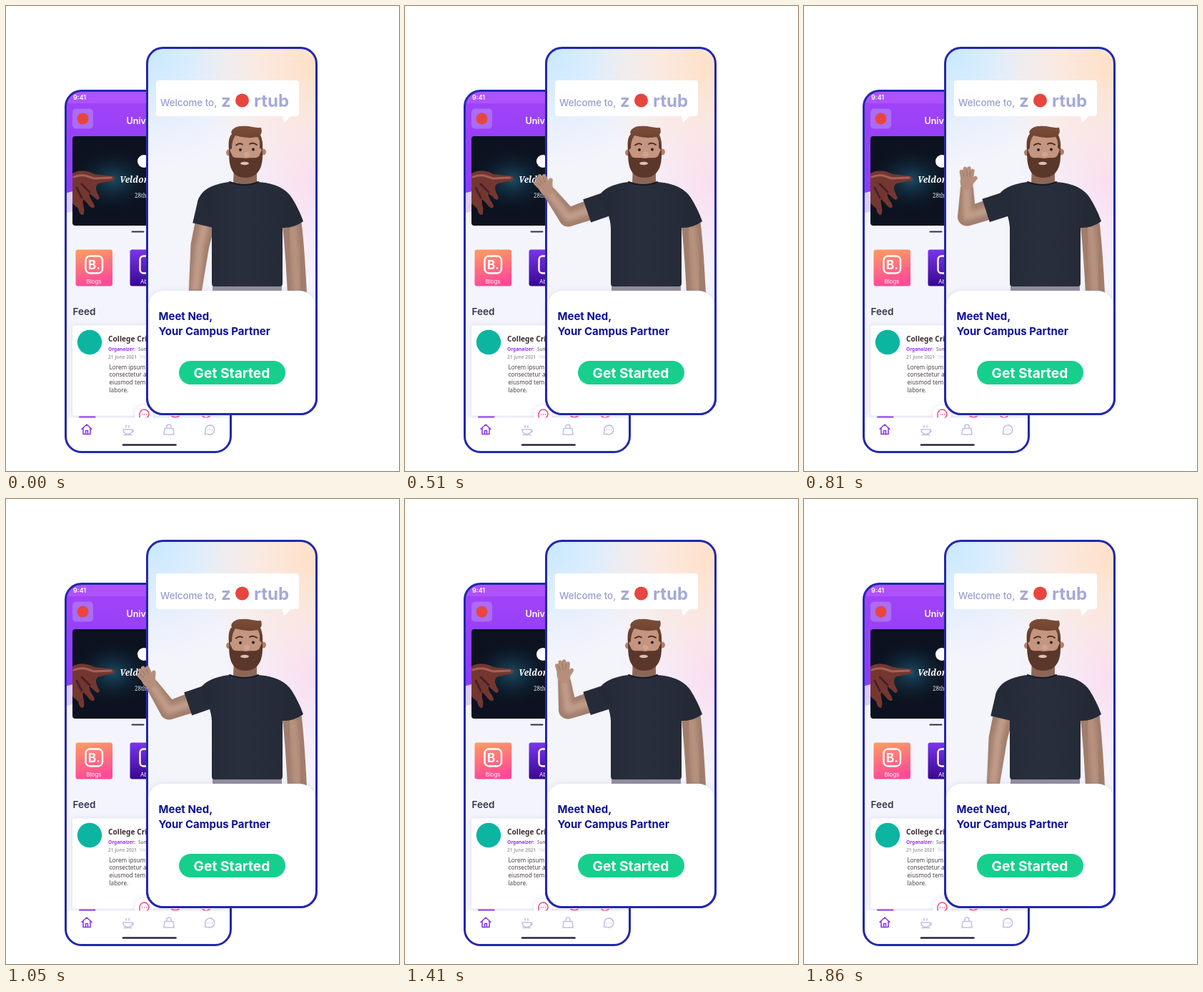
Write an HTML page that moves like this. It is 550 by 650 pixels and loops after 2.7 s.

```html
<!DOCTYPE html>
<html lang="en">
<head>
<meta charset="utf-8">
<style>
html, body { margin: 0; width: 100%; height: 100%; overflow: hidden; background: #fff; }
svg { display: block; }
text { font-family: Inter, sans-serif; }
.body { font-family: "Noto Sans", sans-serif; }
.serif { font-family: "Noto Serif", serif; }
.line { fill: none; stroke-linecap: round; stroke-linejoin: round; }
.frame { fill: none; stroke: #2327ad; stroke-width: 3; }
</style>
</head>
<body>
<svg width="550" height="650" viewBox="0 0 550 650">
<defs>
  <linearGradient id="header" x2="0" y2="1"><stop stop-color="#a344f8"/><stop offset="1" stop-color="#8a3cf6"/></linearGradient>
  <linearGradient id="blogs" x2=".2" y2="1"><stop stop-color="#ff9d60"/><stop offset="1" stop-color="#ff4a97"/></linearGradient>
  <linearGradient id="about" x2="0" y2="1"><stop stop-color="#7a35ee"/><stop offset="1" stop-color="#38078f"/></linearGradient>
  <radialGradient id="glow"><stop stop-color="#1c5670" stop-opacity=".85"/><stop offset="1" stop-color="#0c1220" stop-opacity="0"/></radialGradient>
  <radialGradient id="sky" gradientUnits="userSpaceOnUse" cx="205" cy="65" r="160"><stop stop-color="#c8e9ff"/><stop offset="1" stop-color="#d6e8ff" stop-opacity="0"/></radialGradient>
  <radialGradient id="peach" gradientUnits="userSpaceOnUse" cx="425" cy="85" r="165"><stop stop-color="#ffe0c8"/><stop offset="1" stop-color="#ffe4d4" stop-opacity="0"/></radialGradient>
  <radialGradient id="pink" gradientUnits="userSpaceOnUse" cx="440" cy="245" r="140"><stop stop-color="#fbdcee"/><stop offset="1" stop-color="#f8e0f2" stop-opacity="0"/></radialGradient>
  <linearGradient id="shirt"><stop stop-color="#242937"/><stop offset=".45" stop-color="#2a2f3e"/><stop offset="1" stop-color="#252a37"/></linearGradient>
  <linearGradient id="hair" x2="0" y2="1"><stop stop-color="#7c4e39"/><stop offset="1" stop-color="#5d382b"/></linearGradient>
  <filter id="soft" x="-50%" y="-50%" width="200%" height="200%"><feGaussianBlur stdDeviation="3"/></filter>
  <filter id="shade" x="-20%" y="-20%" width="140%" height="140%"><feDropShadow dx="0" dy="0" stdDeviation="3" flood-color="#6a70b0" flood-opacity=".2"/></filter>
  <clipPath id="backClip"><rect x="83.500" y="118.500" width="231" height="505" rx="22"/></clipPath>
  <clipPath id="bannerClip"><rect x="93" y="182" width="211" height="125" rx="4"/></clipPath>
</defs>

<!-- back phone -->
<g clip-path="url(#backClip)">
  <rect x="82" y="117" width="234" height="508" fill="#f4f5fc"/>
  <path d="M82 117H316V230L82 290Z" fill="#dccdfb"/>
  <path d="M82 117H316V200L82 262Z" fill="url(#header)"/>
  <path d="M82 117H316V136H82Z" fill="#ae52fb"/>
  <text x="94" y="131" font-size="9" font-weight="600" fill="#fff">9:41</text>
  <rect x="93" y="143.500" width="29" height="28" rx="5" fill="#b07af6" opacity=".75"/>
  <circle cx="107.500" cy="157.500" r="8" fill="#e8453f"/>
  <text x="168.500" y="165" font-size="12.500" font-weight="600" fill="#fff">University</text>

  <g clip-path="url(#bannerClip)">
    <rect x="93" y="182" width="211" height="125" fill="#0c1220"/>
    <ellipse cx="150" cy="243" rx="60" ry="48" fill="url(#glow)"/>
    <path d="M93 234C105 227 116 231 124 235L150 238Q154 241 150 244L130 248C122 252 128 262 131 268Q129 274 124 268L117 262C115 268 124 275 124 281Q120 285 113 275L108 270C106 277 112 284 108 292Q103 293 101 283L93 276Z" fill="#74372f"/>
    <path d="M95 239C106 234 114 238 123 241L147 240" class="line" stroke="#a4625a" stroke-width="3"/>
    <path d="M106 249L117 260M99 254L106 268" class="line" stroke="#45202b" stroke-width="3"/>
    <circle cx="193" cy="217" r="9" fill="#fff"/>
    <text class="serif" x="159" y="247" font-size="12" font-style="italic" font-weight="600" fill="#fff">Veldor Night</text>
    <text class="serif" x="180" y="268" font-size="8" fill="#dfe8ee">28th</text>
  </g>
  <path d="M176.500 315.500H192.500" class="line" stroke="#2c2e55" stroke-width="2"/>

  <rect x="97.500" y="340.500" width="51.500" height="51" rx="3" fill="url(#blogs)"/>
  <rect x="111.500" y="349.500" width="23.500" height="24" rx="6" class="line" stroke="#fff" stroke-width="2.400"/>
  <text x="123.500" y="368" font-size="17" font-weight="700" text-anchor="middle" fill="#fff">B.</text>
  <text x="123" y="387.500" font-size="8" text-anchor="middle" fill="#fff">Blogs</text>
  <rect x="173.500" y="340.500" width="51.500" height="51" rx="3" fill="url(#about)"/>
  <rect x="187.500" y="349.500" width="24" height="24" rx="5" class="line" stroke="#fff" stroke-width="2.400"/>
  <text x="188" y="387.500" font-size="8" fill="#fff">About</text>

  <text x="93.500" y="431.500" font-size="13.500" font-weight="600" fill="#34354f">Feed</text>
  <rect x="93" y="446.500" width="211" height="126" rx="4" fill="#fff" filter="url(#shade)"/>
  <circle cx="117" cy="470" r="17.200" fill="#0cb5a0"/>
  <text class="body" x="143" y="468.500" font-size="10.200" font-weight="700" fill="#3c2b2f">College Cricket</text>
  <text class="body" x="143" y="482" font-size="6.500" font-weight="700" fill="#9430ee">Organaizer:</text>
  <text class="body" x="185" y="482" font-size="6.500" fill="#5c5563">Sunday Club</text>
  <text class="body" x="143" y="493" font-size="6.500" font-weight="600" fill="#a9a5b0">21 june 2021</text>
  <text class="body" x="186" y="493" font-size="6.500" fill="#c9c7d2">1hr ago</text>
  <g id="lorem" fill="#4c4249" font-size="8.200"></g>

  <circle cx="193" cy="571" r="13" fill="#fff" filter="url(#shade)"/>
  <g class="line" stroke="#f5447f" stroke-width="1.500">
    <path d="M187 576V570A6.500 6.500 0 1 1 194 577H187Z"/>
    <path d="M190.500 571H190.600M193.500 571H193.600M196.500 571H196.600"/>
    <path d="M232 573.500Q237 576 242 573.500M275 573.500L280 576L285 573.500"/>
  </g>
  <rect x="82" y="575.500" width="234" height="50" fill="#fff"/>
  <path d="M103 574.500H124.500" class="line" stroke="#9336f0" stroke-width="2"/>
  <path d="M106 591.500L113 585L120 591.500M108 590V598.500H118V590M111.500 598V593.500H114.500V598" class="line" stroke="#8a35ee" stroke-width="1.600"/>
  <g class="line" stroke="#c3c1e6" stroke-width="1.600">
    <path d="M164 592H177C177 597 174 598.500 170.500 598.500S164 597 164 592ZM177 593Q180 594 176 596M168 589V586.500M172 589V586.500M165 599.500H176"/>
    <path d="M222 590.500H234L235 599H221ZM225 590V588A3 3 0 0 1 231 588V590"/>
    <path d="M278.500 598.500L279 594A6.500 6.500 0 1 1 283 598.500ZM282.500 592.500H282.600M285.500 592.500H285.600M288.500 592.500H288.600"/>
  </g>
  <path d="M164 613.500H237.500" class="line" stroke="#25263f" stroke-width="2.600"/>
</g>
<rect class="frame" x="83.500" y="118.500" width="231" height="505" rx="22"/>

<!-- front phone -->
<g id="screen"></g>
<rect class="frame" x="197.500" y="58.500" width="237" height="512" rx="22"/>
<path d="M214 104H406Q410 104 410 108V150Q410 154 406 154H398L390 163Q388 163 387 154H214Q210 154 210 150V108Q210 104 214 104Z" fill="#fff"/>
<text x="216" y="140" font-size="13.300" font-weight="500" fill="#989dd0">Welcome to,</text>
<g font-size="24" font-weight="700" fill="#a5a9d8">
  <text x="301" y="141">z</text>
  <text x="347" y="141">rtub</text>
</g>
<circle cx="330.500" cy="132" r="9.500" fill="#e8453f"/>

<!-- character -->
<rect x="289" y="385" width="97" height="20" fill="#928e9c"/>
<path d="M399 295Q404 330 408 412" class="line" stroke="#a07d6c" stroke-width="27"/>
<path d="M401 310Q405 340 408 412" class="line" stroke="#b8937f" stroke-width="12" filter="url(#soft)"/>
<path d="M360 247C378 249 392 256 400 268Q410 284 416 301Q402 311 386 310Z" fill="#242936"/>
<path id="skin" fill="#a17e6d"/>
<path id="light" class="line" stroke="#c29d8a" stroke-width="11" filter="url(#soft)"/>
<g id="hand" class="line" stroke="#b58f7c" stroke-width="5.600">
  <ellipse cy="9" rx="9.500" ry="11.500" fill="#b58f7c" stroke="none"/>
  <path d="M-6 13L-8 24M-2 14L-3 27.500M2 14L2.500 27M6 13L7.500 23M-7 8L-12 14"/>
  <path d="M-4 16L-5.500 23M0 17V25M4 16L5 22" stroke="#987361" stroke-width="1"/>
</g>
<circle cx="285" cy="276" r="17" fill="#262b39"/>
<path id="sleeve" stroke="#262b39" stroke-width="34"/>
<path d="M319 224H351V247Q335 257 318 247Z" fill="#8d6756"/>
<path d="M313 246Q334 253 353 246C374 248 389 253 395 265Q389 285 387 310V388Q387 392 383 392H292Q288 392 288 388V310Q287 290 272 265C279 253 296 248 313 246Z" fill="url(#shirt)"/>
<path d="M313 246Q334 254 353 246" class="line" stroke="#161a24" stroke-width="2"/>
<circle cx="312.500" cy="205" r="4.500" fill="#b07f6a"/>
<circle cx="359.500" cy="204" r="4.500" fill="#b07f6a"/>
<rect x="314" y="177" width="44" height="50" rx="14" fill="#c4957f"/>
<path d="M312 202C311 189 312 183 316 179C313 174 321 167.500 330 168C340 167 349 171 357 170Q359 177 356 180Q360 188 359 202L355 198Q356 187 352 183Q337 186 321 181Q316 188 316 199Z" fill="url(#hair)"/>
<path d="M312.500 200C311 222 315 240 335 240C355 240 361 222 358.500 200L354 210C349 214 342 211 336 213C329 211 321 214 317 210Z" fill="#5b372b"/>
<ellipse cx="334" cy="220" rx="6" ry="2.200" fill="#dcc0b4"/>
<ellipse cx="337" cy="207.500" rx="4" ry="3.400" fill="#d2a48f"/>
<path d="M322 194.500Q327 190.500 331 193.500M341 193Q346 190 351 194" class="line" stroke="#4b2e25" stroke-width="2"/>
<circle cx="328" cy="201" r="1.900" fill="#20191b"/>
<circle cx="346" cy="200.500" r="1.900" fill="#20191b"/>

<!-- bottom card -->
<path d="M199 420A22 22 0 0 1 221 398H411A22 22 0 0 1 433 420V549A20 20 0 0 1 413 569H219A20 20 0 0 1 199 549Z" fill="#fff" filter="url(#shade)"/>
<path d="M197.500 420V548.500A22 22 0 0 0 219.500 570.500H412.500A22 22 0 0 0 434.500 548.500V420" class="frame"/>
<g font-size="15" font-weight="700" fill="#0e1296">
  <text x="213.500" y="439">Meet Ned,</text>
  <text x="213.500" y="460">Your Campus Partner</text>
</g>
<rect x="242" y="496" width="149" height="33" rx="16.500" fill="#17cf8c"/>
<text x="316" y="520" font-size="19.200" font-weight="700" text-anchor="middle" fill="#fff">Get Started</text>
</svg>
<script>
const $ = id => document.getElementById(id);

$('screen').innerHTML = ['#f4f4fb', 'url(#pink)', 'url(#sky)', 'url(#peach)']
  .map(fill => `<rect x="197.500" y="58.500" width="237" height="512" rx="22" fill="${fill}"/>`).join('');
$('lorem').innerHTML = ['Lorem ipsum dolor', 'consectetur adipis', 'eiusmod tempor', 'labore.']
  .map((s, i) => `<text class="body" x="144.500" y="${507.5 + i * 10.7}">${s}</text>`).join('');

// step, upper arm angle, forearm angle (degrees from straight down, outwards)
const poses = [
  [0, 13, 6], [2, 21, 14], [5, 42, 45], [8, 62, 98], [11, 71, 143], [15, 72, 176], [18, 72, 180],
  [23, 71, 146], [28, 72, 180], [31, 72, 173], [34, 66, 138], [37, 50, 75], [39, 27, 26], [41, 13, 6]
];
const shoulder = [285, 276];
const lastStep = 41;

function reach([x, y], deg, len) {
  const a = deg * Math.PI / 180;
  return [x - Math.sin(a) * len, y + Math.cos(a) * len];
}

// tapered limb with round ends of radius ra and rb
function limb(a, b, deg, ra, rb) {
  const side = (p, r) => reach(p, deg + 90, r);
  return `M${side(a, ra)}L${side(b, rb)}A${rb} ${rb} 0 0 0 ${side(b, -rb)}` +
    `L${side(a, -ra)}A${ra} ${ra} 0 0 0 ${side(a, ra)}Z`;
}

function poseAt(step) {
  const i = Math.max(1, poses.findIndex(p => p[0] >= step));
  const a = poses[i - 1], b = poses[i], k = (step - a[0]) / (b[0] - a[0]);
  return [1, 2].map(j => a[j] + (b[j] - a[j]) * k);
}

function draw(t) {
  // two steps per 90 ms, held for 60 and 30 ms
  const step = Math.min(lastStep, 2 * Math.floor(t / 90) + (t % 90 >= 60 ? 1 : 0));
  const [upper, fore] = poseAt(step);
  // the forearm leans towards the viewer as it rises
  const foreLength = 52 + 12 * Math.cos(fore * Math.PI / 180);
  const elbow = reach(shoulder, upper, 60), wrist = reach(elbow, fore, foreLength);
  $('skin').setAttribute('d', limb(shoulder, elbow, upper, 15, 13) + limb(elbow, wrist, fore, 13, 9));
  $('light').setAttribute('d', `M${shoulder}L${elbow}L${wrist}`);
  $('sleeve').setAttribute('d', `M${shoulder}L${reach(shoulder, upper, 32)}`);
  $('hand').setAttribute('transform', `translate(${wrist}) rotate(${fore})`);
}

const start = performance.now();
function tick() {
  draw((performance.now() - start) % 2700);
  requestAnimationFrame(tick);
}
tick();
</script>
</body>
</html>
```
